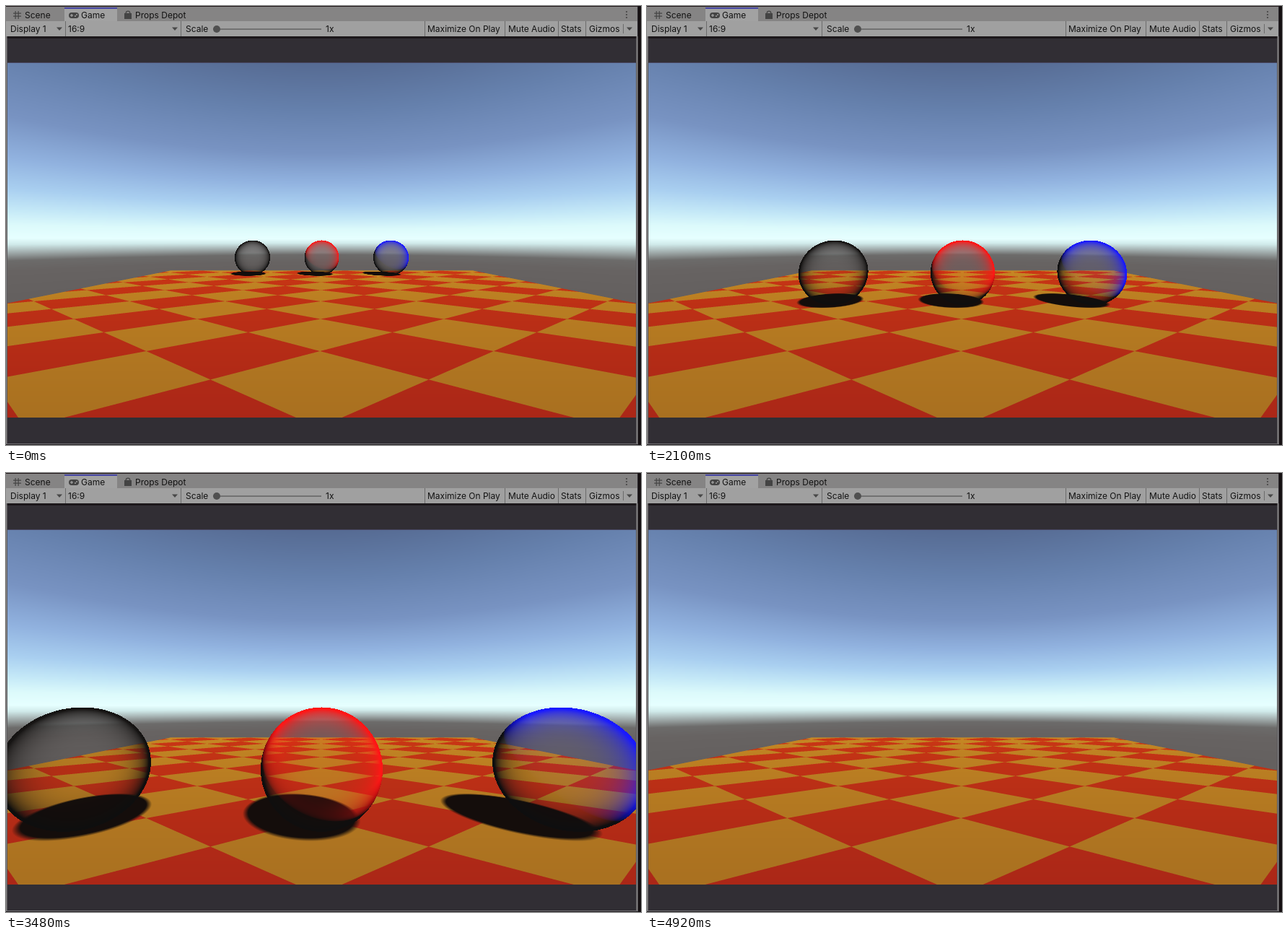
Write an HTML page with a canvas that moves like this. It is 880 px wide and 608 px high and loops after 4980 ms.

```html
<!DOCTYPE html>
<html lang="en">
<head>
<meta charset="utf-8">
<title>Three glass spheres</title>
<style>
html, body { margin: 0; width: 100%; height: 100%; overflow: hidden; background: #312e34; }
canvas { display: block; }
</style>
</head>
<body>
<canvas id="stage" width="880" height="608"></canvas>
<script>
const ctx = document.getElementById('stage').getContext('2d');
const LOOP = 4980, STEP = 60;

// Viewport and pinhole camera; the eye is level with the sphere tops
const VX = 2, VY = 79, VW = 871, VH = 491;
const CX = 437.5, CY = 324.5, F = 424.8;
const FLOOR_TOP = 42;

const lerp = (a, b, k) => a + (b - a) * k;
const clamp = (v, a = 0, b = 1) => Math.min(b, Math.max(a, v));
const hex = s => [1, 3, 5].map(i => parseInt(s.slice(i, i + 2), 16));

// Sky colour by height above the horizon, top to bottom
const SKY = [
  [245, '#566b93'], [180, '#6580ac'], [120, '#7893c2'], [80, '#91b2df'],
  [50, '#a9cff0'], [30, '#c4e8f7'], [15, '#dcfafb'], [2, '#e6ffff'],
  [-4, '#d0eaea'], [-12, '#a0abab'], [-20, '#6c6b6a'], [-30, '#676362'], [-90, '#605c5b']
].map(([h, c]) => [h, hex(c)]);

const ORANGE = [hex('#c98a24'), hex('#a97020')];
const RED = [hex('#ce3914'), hex('#ab2717')];

function skyAt(dx, dy) {
  const h = -dy / Math.hypot(1, dx / F);
  let i = 1;
  while (i < SKY.length - 1 && SKY[i][0] > h) i++;
  const [h0, a] = SKY[i - 1], [h1, b] = SKY[i];
  const k = clamp((h0 - h) / (h0 - h1));
  return a.map((v, n) => lerp(v, b[n], k));
}

function worldAt(dx, dy) {
  if (dy < FLOOR_TOP || Math.abs(dx / dy) > 5) return skyAt(dx, dy);
  const u = (dx / dy + 0.0155) / 0.784;
  const v = (F / dy - 2.767) / 0.565;
  const odd = (Math.floor((u + v) / 2) + Math.floor((u - v) / 2)) & 1;
  const [far, near] = odd ? ORANGE : RED;
  const k = Math.sqrt(clamp((dy - FLOOR_TOP) / 204));
  return far.map((c, n) => lerp(c, near[n], k));
}

function renderWorld() {
  const img = ctx.createImageData(VW, VH), d = img.data;
  for (let y = 0, p = 0; y < VH; y++) {
    for (let x = 0; x < VW; x++, p += 4) {
      const sum = [0, 0, 0];
      const n = y + VY > 360 ? 3 : 1;
      for (let s = 0; s < n * n; s++) {
        const sx = (s % n + 0.5) / n, sy = (Math.floor(s / n) + 0.5) / n;
        const c = worldAt(x + VX + sx - CX, y + VY + sy - CY);
        for (let i = 0; i < 3; i++) sum[i] += c[i] / (n * n);
      }
      d.set([sum[0], sum[1], sum[2], 255], p);
    }
  }
  return img;
}

// Lengths below are in sphere radii
const SPHERES = [
  { x: -4, color: [22, 20, 19] },
  { x: 0, color: [255, 22, 22] },
  { x: 4, color: [25, 25, 255] }
];
const LIGHT = [0.321, 0.766, -0.557];
const SHADOW = [20, 13, 11];
const NEAR = 0.6;
const PATH = [[0, 17.75], [1500, 12], [2100, 9.58], [2700, 7.5], [3060, 6.44],
  [3480, 5.125], [4140, 3.124], [4920, 0.55], [4980, 0.35]];

function depthAt(t) {
  let i = 1;
  while (i < PATH.length - 1 && PATH[i][0] < t) i++;
  const [t0, a] = PATH[i - 1], [t1, b] = PATH[i];
  return lerp(a, b, (t - t0) / (t1 - t0));
}

function blend(d, p, c, a) {
  for (let i = 0; i < 3; i++) d[p + i] = lerp(d[p + i], c[i], a);
}

function shadowAt(dx, dy, sx, z) {
  const Z = 2 * F / dy, X = dx * Z / F;
  const ox = X - sx + 0.4195, oz = Z - z - 0.727;
  const along = (-0.5 * ox + 0.866 * oz) / 1.305;
  const across = 0.866 * ox + 0.5 * oz;
  return clamp((1.03 - Math.hypot(along, across)) / 0.1);
}

function shadeSphere(d, p, dx, dy, s, z) {
  const len = Math.hypot(dx, dy, F);
  const vx = dx / len, vy = -dy / len, vz = F / len;
  const b = vx * s.x - vy + vz * z;
  const disc = b * b - (s.x * s.x + z * z);
  if (disc < 0) return;
  const facing = Math.sqrt(disc), t = b - facing;
  if (t * vz < NEAR) return;

  const nl = (vx * t - s.x) * LIGHT[0] + (vy * t + 1) * LIGHT[1] + (vz * t - z) * LIGHT[2];
  const lit = clamp(1.45 * Math.sqrt(Math.max(nl, 0)), 0.06);
  const alpha = clamp(0.06 + 1.5 * Math.pow(1 - facing, 1.6));
  // The glass mutes the bright horizon
  if (dy < FLOOR_TOP) for (let i = 0; i < 3; i++) d[p + i] = Math.min(d[p + i], 130);
  blend(d, p, s.color.map(c => Math.max(c * lit, 14)), alpha);
}

const world = renderWorld();
const view = ctx.createImageData(VW, VH);

function drawView(t) {
  const z = depthAt(t), d = view.data;
  d.set(world.data);
  for (let y = 323 - VY; y < VH; y++) {
    const dy = y + VY + 0.5 - CY;
    for (let x = 0; x < VW; x++) {
      const dx = x + VX + 0.5 - CX, p = (y * VW + x) * 4;
      if (dy > FLOOR_TOP) {
        for (const s of SPHERES) {
          const a = shadowAt(dx, dy, s.x, z);
          if (a) blend(d, p, SHADOW, a);
        }
      }
      for (const s of SPHERES) shadeSphere(d, p, dx, dy, s, z);
    }
  }
  ctx.putImageData(view, VX, VY);
}

function rect(color, x, y, w, h) {
  ctx.fillStyle = color;
  ctx.fillRect(x, y, w, h);
}

function disc(color, x, y, r) {
  ctx.fillStyle = color;
  ctx.beginPath();
  ctx.arc(x, y, r, 0, 7);
  ctx.fill();
}

function label(text, x, y) {
  ctx.fillStyle = '#121212';
  ctx.fillText(text, x, y);
}

function arrow(x, y) {
  ctx.fillStyle = '#484848';
  ctx.beginPath();
  ctx.moveTo(x - 4, y - 2);
  ctx.lineTo(x + 4, y - 2);
  ctx.lineTo(x, y + 2.5);
  ctx.fill();
}

function drawIcons() {
  const ink = '#444';
  for (const o of [0, 4]) {
    rect(ink, 12.5 + o, 7, 1.2, 11);
    rect(ink, 10, 9.5 + o, 11, 1.2);
  }

  ctx.fillStyle = ink;
  ctx.beginPath();
  ctx.roundRect(87, 9, 14, 8, 4);
  ctx.fill();
  rect('#a2a2a2', 89, 12.4, 4, 1.2);
  rect('#a2a2a2', 90.4, 11, 1.2, 4);
  disc('#a2a2a2', 96, 14, 1);
  disc('#a2a2a2', 98, 12, 1);

  rect(ink, 164, 10, 10, 8);
  ctx.strokeStyle = ink;
  ctx.lineWidth = 1.3;
  ctx.beginPath();
  ctx.arc(169, 10, 2.8, Math.PI, 0);
  ctx.stroke();

  for (const y of [8, 12, 16]) disc(ink, 860, y, 1.1);
}

function drawChrome() {
  rect('#312e34', 0, 0, 880, 608);
  rect('#858484', 0, 1, 875, 20);
  rect('#1d1416', 0, 0, 880, 1);
  rect('#a2a2a2', 81, 2, 73, 19);
  rect('#4747a5', 81, 2, 73, 2);
  rect('#a0a0a0', 0, 21, 875, 21);
  rect('#1c181b', 0, 42, 875, 3);
  rect('#47455f', VX, 78, VW, 1);
  rect('#858484', 0, 42, 1.5, 566);
  rect('#858484', 873.5, 42, 2, 566);
  rect('#151012', 876, 0, 4, 608);
  rect('#77767a', 0, 606, 876, 1);
  rect('#1c181b', 0, 607, 876, 1);

  ctx.font = '12px Inter, Roboto, sans-serif';
  label('Scene', 26, 17);
  label('Game', 104, 17);
  label('Props Depot', 179, 17);
  label('Display 1', 6, 36);
  label('16:9', 86, 36);
  label('Scale', 249, 36);
  label('1x', 443, 36);
  label('Maximize On Play', 584, 36);
  label('Mute Audio', 696, 36);
  label('Stats', 769, 36);
  label('Gizmos', 808, 36);

  for (const x of [82, 242, 580, 691, 765, 803]) rect('#6b6b6b', x, 21, 1, 21);
  rect('#6b6b6b', 855, 25, 1, 13);
  for (const x of [74, 234, 864]) arrow(x, 31.5);
  rect('#666', 287, 31.3, 150, 1.6);
  disc('#505050', 292, 32, 5);
  drawIcons();
}

let shown = -1;
const start = performance.now();
function tick() {
  const t = Math.floor(((performance.now() - start) % LOOP) / STEP) * STEP;
  if (t !== shown) drawView(shown = t);
  requestAnimationFrame(tick);
}
drawChrome();
tick();
</script>
</body>
</html>
```
